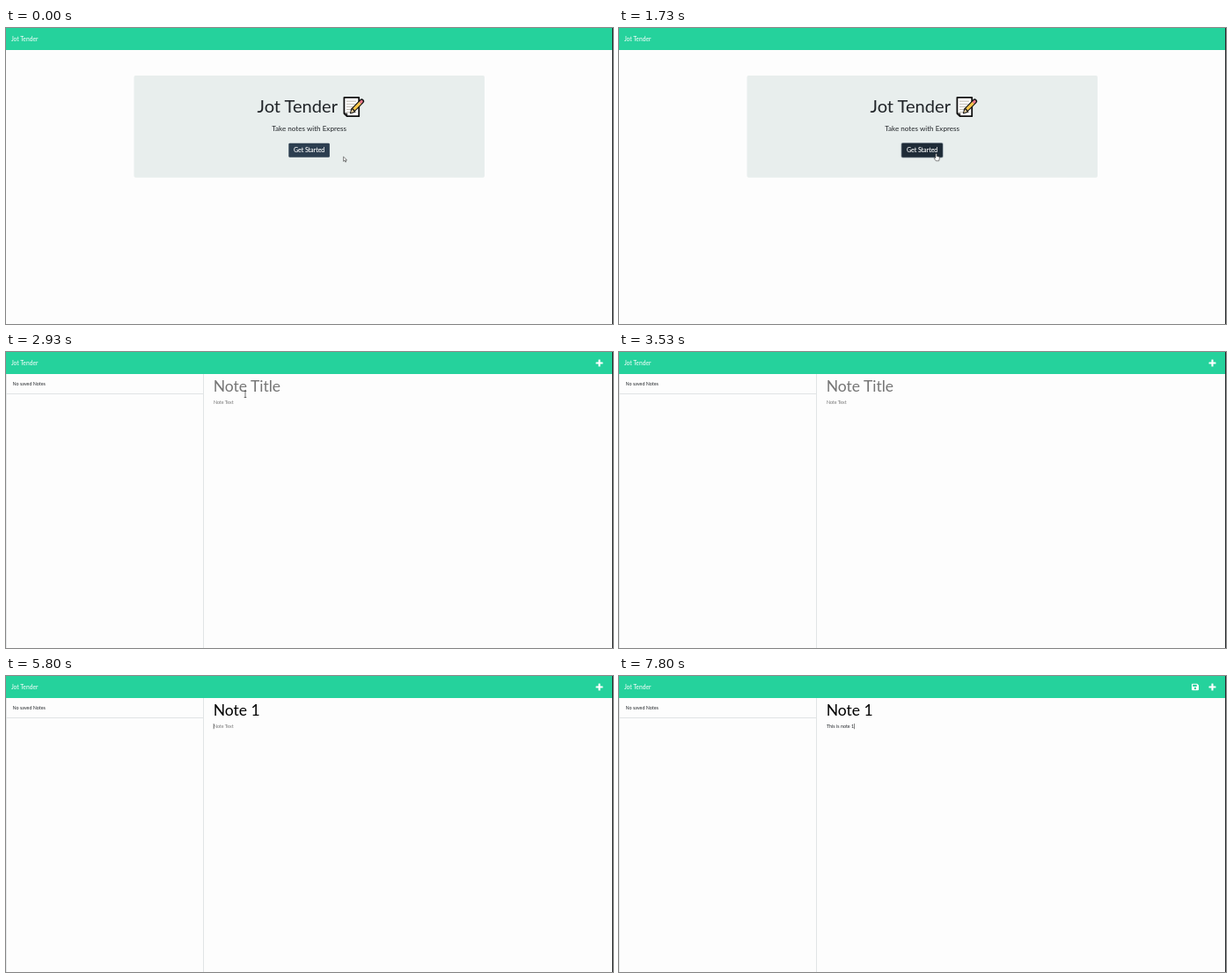
Recreate the animation shown at these times as an HTML page. Size 690 px wide and 336 px high, loop 8000 ms.

```html
<!DOCTYPE html>
<html lang="en">
<head>
<meta charset="utf-8">
<title>Notes demo</title>
<style>
  html, body { margin: 0; width: 100%; height: 100%; overflow: hidden; background: #fdfdfd; }
  svg { display: block; width: 100%; height: 100%; }
  text { font-family: Lato, sans-serif; white-space: pre; fill: #212529; }
  .brand { font-size: 6.7px; fill: #fff; }
  .h1 { font-size: 20.1px; text-anchor: end; }
  .lead { font-size: 8.1px; text-anchor: middle; }
  .btn { font-size: 7px; text-anchor: middle; fill: #fff; stroke: #fff; stroke-width: .12px; }
  .title { font-size: 17.5px; fill: #000; }
  .small { font-size: 5.35px; }
  .hint { fill: #757575; }
  .rule { stroke: #e1e4e5; stroke-width: 1; }
  .icon { fill: #fff; fill-rule: evenodd; }
  .pointer { fill: #fff; stroke: #333; stroke-width: .6; stroke-linejoin: round; }
</style>
</head>
<body>
<svg viewBox="0 0 690 336" preserveAspectRatio="none">
  <rect width="690" height="336" fill="#fdfdfd"/>

  <g id="home">
    <rect x="145.5" y="54" width="398.5" height="115.8" rx="1.7" fill="#e8eeed"/>
    <text class="h1" x="377" y="96.2">Jot Tender</text>
    <g stroke-linecap="round" stroke-linejoin="round" fill="none">
      <path d="M384.4 78.9H401.2V100.2H387.6L384.4 97Z" fill="#fff" stroke="#111" stroke-width="1.8"/>
      <path d="M387.4 83.2H397.6M387.4 86.3H396.4M387.4 89.4H394M387.4 92.5H391.6M387.4 95.6H398" stroke="#b9b4a8" stroke-width=".9"/>
      <path d="M384.6 97H387.7V100" stroke="#111" stroke-width="1"/>
      <path d="M404.4 83.2L394.6 93.2" stroke="#111" stroke-width="5.4"/>
      <path d="M391.4 96.6L393 91.5L396.5 95Z" fill="#f2d6a2" stroke="#111" stroke-width="1"/>
      <path d="M403 84.7L395.4 92.4" stroke="#f7c64a" stroke-width="3.2" stroke-linecap="butt"/>
      <path d="M404.2 83.4L403.4 84.2" stroke="#e9788a" stroke-width="3"/>
    </g>
    <text class="lead" x="344.6" y="117">Take notes with Express</text>
    <rect id="ring" x="320.5" y="129.9" width="48.2" height="17.7" rx="2" fill="#9aa5ae"/>
    <rect id="button" x="321.3" y="130.7" width="46.6" height="16.1" rx="1.4"/>
    <text class="btn" x="344.6" y="141.2">Get Started</text>
    <path id="arrow" class="pointer" d="M0 0V5.3L1.3 4.1L2.2 6.1L3.1 5.7L2.2 3.8H3.9Z"/>
    <path id="hand" class="pointer" d="M-.7 .5Q0-.4 .7 .5V3L3.2 3.7Q4 4 3.8 5L3.1 8.3H-.3L-2.5 5.4Q-2.4 4.2-.7 5.2Z"/>
  </g>

  <g id="editor">
    <path class="rule" d="M.3 25V336M224.5 25V336"/>
    <g id="list">
      <path class="rule" d="M0 47.5H224.5"/>
      <text class="small" x="7.6" y="38.3">No saved Notes</text>
    </g>
    <text id="titleHint" class="title hint" x="235.7" y="45.2">Note Title</text>
    <text id="title" class="title" x="235.7" y="45.2" xml:space="preserve"></text>
    <text id="noteHint" class="small hint" x="235.9" y="59">Note Text</text>
    <text id="note" class="small" x="235.9" y="59" xml:space="preserve"></text>
    <rect id="caret" fill="#333"/>
    <path id="beam" d="M-1.3-3.5H1.3M0-3.5V3.5M-1.3 3.5H1.3" stroke="#333" stroke-width=".7"/>
  </g>

  <rect width="690" height="25" fill="#25d29c"/>
  <text class="brand" x="5.9" y="15">Jot Tender</text>
  <g id="plus" class="icon">
    <rect x="670.5" y="11.4" width="8" height="2.1" rx=".5"/>
    <rect x="673.45" y="8.5" width="2.1" height="8" rx=".5"/>
  </g>
  <path id="save" class="icon" d="M652 8.7H657.2L659 10.5V15.3Q659 16.3 658 16.3H652Q651 16.3 651 15.3V9.7Q651 8.7 652 8.7ZM652.2 9.8V12H656.8V9.8ZM655 12.8A1.2 1.2 0 1 0 655 15.2A1.2 1.2 0 1 0 655 12.8Z"/>
  <rect x="689" width="1" height="336" fill="#25282a"/>
</svg>

<script>
const LOOP = 8000;
const OPEN = 1800, LISTED = 1930;
const ui = {};
document.querySelectorAll('[id]').forEach(el => ui[el.id] = el);

// Each row: start time, value
const titleSteps = [[0, ''], [3930, 'N'], [4200, 'No'], [4330, 'Note'], [4530, 'Note '], [4730, 'Note 1']];
const typing = [6200, 6330, 6460, 6530, 6660, 6800, 6930, 7060, 7200, 7260, 7330, 7460, 7600, 7800];
const noteSteps = [[0, ''], ...typing.map((t, i) => [t, 'This is note 1'.slice(0, i + 1)])];
const caretSteps = [[0, ''], [3000, 'title'], [3530, ''], [3930, 'title'], [5200, ''], [5600, 'note']];
const beamSteps = [[0, null], [2930, [272, 48]], [3000, [268, 42]], [3130, null],
  [5330, [258, 58]], [5460, [250, 64]], [5800, null]];

const at = (steps, t) => steps.filter(s => s[0] <= t).pop()[1];
const show = (el, on) => el.setAttribute('display', on ? 'inline' : 'none');
const move = (el, x, y) => el.setAttribute('transform', `translate(${x} ${y})`);

function drawHome(t) {
  const step = t < 60 ? 0 : Math.min(9, Math.floor((t - 60) / 117.5) + 1);
  const p = step / 9, ease = p * p * (3 - 2 * p);
  const x = 383.6 - 23 * ease, y = 146.1 - 3.6 * ease;
  const over = x < 368;
  show(ui.arrow, !over);
  show(ui.hand, over);
  move(ui.arrow, x, y);
  move(ui.hand, x, y);
  ui.button.setAttribute('fill', over ? '#1e2b37' : '#2c3e50');
  show(ui.ring, t >= 1600);
}

function drawCaret(field) {
  show(ui.caret, field);
  if (!field) return;
  const big = field === 'title', el = ui[field];
  const box = {
    x: 235.8 + (el.textContent ? el.getComputedTextLength() : 0),
    y: big ? 30 : 54,
    width: big ? .8 : .6,
    height: big ? 17.8 : 6.2
  };
  for (const k in box) ui.caret.setAttribute(k, box[k]);
}

function drawEditor(t) {
  const title = at(titleSteps, t), note = at(noteSteps, t), beam = at(beamSteps, t);
  if (ui.title.textContent !== title) ui.title.textContent = title;
  if (ui.note.textContent !== note) ui.note.textContent = note;
  show(ui.titleHint, !title);
  show(ui.noteHint, !note);
  show(ui.list, t >= LISTED);
  drawCaret(at(caretSteps, t));
  show(ui.beam, beam);
  if (beam) move(ui.beam, ...beam);
}

function draw(now) {
  const t = now % LOOP;
  show(ui.home, t < OPEN);
  show(ui.editor, t >= OPEN);
  show(ui.plus, t >= LISTED);
  show(ui.save, t >= typing[0]);
  if (t < OPEN) drawHome(t); else drawEditor(t);
}

const start = performance.now();
function tick() {
  draw(performance.now() - start);
  requestAnimationFrame(tick);
}
tick();
</script>
</body>
</html>
```
